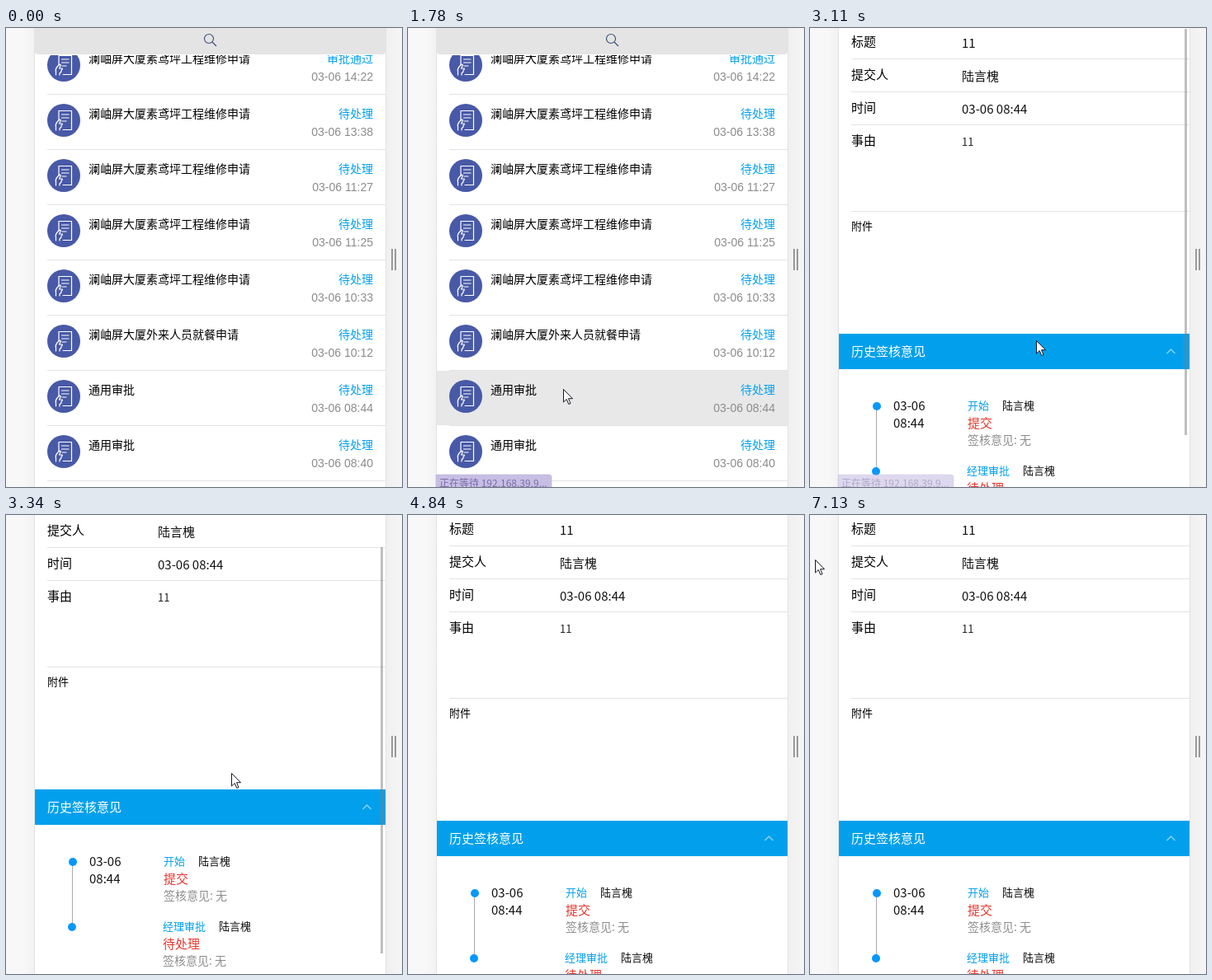
These frames come from a looping animation (480 by 557 pixels, 8 s). An HTML page:

```html
<!DOCTYPE html>
<html lang="zh-CN">
<head>
<meta charset="utf-8">
<style>
html, body { margin: 0; width: 100%; height: 100%; overflow: hidden; background: #f8f8f8; }
svg { display: block; width: 480px; height: 557px; }
text { font-family: "Noto Sans CJK SC", "Noto Sans CJK", sans-serif; white-space: pre; }
.arial { font-family: "Liberation Sans", Arial, sans-serif; }
</style>
</head>
<body>
<svg viewBox="0 0 480 557">
  <defs>
    <linearGradient id="edgeL"><stop stop-color="#f8f8f8"/><stop offset="1" stop-color="#f2f2f2"/></linearGradient>
    <linearGradient id="edgeR"><stop stop-color="#f0f0f0"/><stop offset="1" stop-color="#f5f5f5"/></linearGradient>
    <clipPath id="phone"><path d="M35 0H460V557H35Z"/></clipPath>
    <clipPath id="below"><path d="M35 33H461V557H35Z"/></clipPath>
    <g id="badge">
      <circle r="20" fill="#4859a7"/>
      <g fill="none" stroke="#fff" stroke-width="1.2" stroke-linecap="round" stroke-linejoin="round">
        <path d="M-6 0V-11.500H9.500V11.500H-1"/>
        <path d="M-2.500 -7H6M-2.500 -3H6M-2 1H3"/>
        <path d="M-9.500 12V8Q-10.500 5 -8 2L-5 -1Q-3 -1 -4 1L-5.500 4M-5.500 4H-2Q-1 5 -3 6V8L-5 10V12"/>
      </g>
    </g>
  </defs>
  <rect width="480" height="557" fill="#f8f8f8"/>
  <rect x="22" width="12" height="557" fill="url(#edgeL)"/>
  <rect x="461" width="19" height="557" fill="url(#edgeR)"/>
  <rect x="34" width="427" height="557" fill="#e3e3e3"/>
  <rect x="35" width="425" height="557" fill="#fff"/>
  <path d="M467 268h2v26h-2zM471 268h2v26h-2z" fill="#999"/>

  <g id="list">
    <g id="rows" clip-path="url(#below)">
      <rect id="tap" x="35" y="416" width="425" height="66" fill="#e8e8e8"/>
    </g>
    <path d="M34 0H461V26Q461 32 455 32H40Q34 32 34 26Z" fill="#e4e4e4"/>
    <g fill="none" stroke="#43527f" stroke-width="1.2"><circle cx="246" cy="13" r="5.500"/><path d="M250 17L255 22"/></g>
  </g>

  <g id="detail" clip-path="url(#phone)">
    <g id="page">
      <g id="form"></g>
      <g id="blank"></g>
      <g id="filled"></g>
    </g>
    <rect id="bar" x="454" width="3" height="493" fill="#808080" fill-opacity=".5"/>
  </g>

  <g id="bubble">
    <path d="M34 542H171Q174 542 174 545V557H34Z" fill="#c8bee4" stroke="#bbb1d8" stroke-width=".6"/>
    <text x="38" y="557" font-size="12" fill="#786ba5">正在等待 192.168.39.9...</text>
  </g>
  <path id="cursor" d="M.5 .5V16L4.200 12.500L6.800 18.500L9 17.500L6.500 11.700H11.500Z" fill="#fff" stroke="#181828"/>
</svg>
<script>
const LOOP = 8000;
const BLUE = '#02a0ec', RED = '#e8372e', GREY = '#8c8c8c', LINE = '#e3e3e4';
const $ = id => document.getElementById(id);

function add(parent, tag, attrs, content) {
  const el = document.createElementNS('http://www.w3.org/2000/svg', tag);
  for (const key in attrs) el.setAttribute(key, attrs[key]);
  if (content) el.textContent = content;
  parent.append(el);
}

// Places text by the vertical middle of its glyphs.
function label(parent, x, mid, size, fill, content, more) {
  add(parent, 'text', { x, y: Math.round(mid + size * 0.37), 'font-size': size, fill, ...more }, content);
}

function rule(parent, x, y) {
  add(parent, 'rect', { x, y, width: 460 - x, height: 1, fill: LINE });
}

function buildList() {
  const rows = $('rows'), end = { 'text-anchor': 'end' };
  const times = '14:22 13:38 11:27 11:25 10:33 10:12 08:44 08:40'.split(' ');
  times.forEach((time, i) => {
    const y = 67 * i;
    const title = i < 5 ? '澜岫屏大厦素鸢坪工程维修申请' : i < 6 ? '澜岫屏大厦外来人员就餐申请' : '通用审批';
    add(rows, 'use', { href: '#badge', x: 70, y: y + 45 });
    label(rows, 100, y + 37, 14, '#000', title);
    label(rows, 445, y + 37, 14, BLUE, i ? '待处理' : '审批通过', end);
    label(rows, 445, y + 59, 14, GREY, '03-06 ' + time, { ...end, class: 'arial' });
    rule(rows, 50, y + 80);
  });
}

function header(parent, y) {
  add(parent, 'rect', { x: 35, y, width: 425, height: 43, fill: BLUE });
  label(parent, 50, y + 21.5, 15, '#fff', '历史签核意见');
}

function buildDetail() {
  const form = $('form'), blank = $('blank'), filled = $('filled');
  const person = '陆言槐';
  const fields = { 标题: '11', 提交人: person, 时间: '03-06 08:44' };
  Object.entries(fields).forEach(([name, value], i) => {
    const y = 40 * i + 16;
    label(form, 50, y, 15, '#000', name);
    label(blank, 184, y + 2, 15, '#757575', name + '信息');
    label(filled, 184, y + 2, 15, '#111', value);
    rule(form, 50, y + 21);
  });
  label(form, 50, 136, 15, '#000', '事由');
  label(filled, 184, 138, 13, '#222', '11');
  rule(form, 50, 222);
  label(form, 50, 240, 13, '#000', '附件', { 'font-weight': 500 });

  header(blank, 362);
  rule(blank, 35, 455);

  header(filled, 371);
  add(filled, 'path', { d: 'M432.500 395l5 -5l5 5', fill: 'none', stroke: '#8fd3f5', 'stroke-width': 1.4 });
  add(filled, 'rect', { x: 80, y: 459, width: 1, height: 79, fill: '#aaa' });
  label(filled, 101, 458, 15, '#111', '03-06');
  label(filled, 101, 479, 15, '#111', '08:44');
  [['开始', '提交'], ['经理审批', '待处理']].forEach(([step, state], i) => {
    const x = 191 - i, y = 458 + 79 * i;
    add(filled, 'circle', { cx: 81 - i, cy: y + 1, r: 5, fill: '#0698fb' });
    label(filled, x, y, 13, BLUE, step);
    label(filled, x + 16 + 13 * step.length, y, 13, '#111', person);
    label(filled, x, y + 21, 15, RED, state);
    label(filled, x, y + 42, 14, GREY, '签核意见: 无');
  });
}

const ramp = (t, from, to) => Math.min(1, Math.max(0, (t - from) / (to - from)));
const ease = (t, from, to) => { const u = ramp(t, from, to); return u * u * (3 - 2 * u); };
const mix = (a, b, u) => a + (b - a) * u;
const frame = t => Math.max(0, t - (t - 210) % 78);

const scrollAt = t => ease(t, 3110, 3500) - ease(t, 4050, 4500);

// Pointer position, or null while it is away.
function pointer(t) {
  if (t < 210) return null;
  if (t < 1400) {
    const u = ease(t, 210, 1000);
    return [mix(309, 191, u) - 75 * Math.sin(Math.PI * u), mix(405, 448, u) + 40 * Math.sin(Math.PI * u)];
  }
  if (t < 2110) {
    const u = ramp(t, 1400, 1550);
    return [mix(191, 188, u), mix(448, 438, u)];
  }
  if (t < 4600) {
    const u = ease(t, 2180, 3090), drag = scrollAt(t);
    return [mix(249, 274, u) - 2 * drag, mix(410, 379, u) - 111 * drag];
  }
  if (t < 4750) return [154, 430];
  if (t >= 5060 && t < 5200) return [12, 12];
  if (t >= 5530 && t < 6540) {
    const u = ramp(t, 5530, 6540);
    return [mix(12, 373, ease(u, 0, 0.8)), u < 0.5 ? 540 * ease(u, 0, 0.45) : 540 - 221 * Math.sin(Math.PI * ramp(u, 0.6, 1))];
  }
  if (t >= 6700 && t < 6760) return [261, 529];
  if (t >= 6910 && t < 7120) return [6, mix(13, 54, ramp(t, 6910, 7060))];
  return null;
}

const show = (id, on) => $(id).setAttribute('display', on ? 'inline' : 'none');
const fade = (id, alpha) => $(id).setAttribute('opacity', alpha);
const move = (id, x, y) => $(id).setAttribute('transform', `translate(${Math.round(x)} ${Math.round(y)})`);

function draw(time) {
  const t = frame(time), open = time >= 2110, loaded = time >= 2480;
  show('list', !open);
  show('tap', time >= 1700);
  show('detail', open);
  show('blank', !loaded);
  show('filled', loaded);

  const top = 64 * scrollAt(t);
  move('page', 0, -top);
  move('bar', 0, 1 + top);
  fade('bar', ramp(t, 2940, 3018) - ramp(t, 3560, 3720) + ramp(t, 4050, 4120) - ramp(t, 4590, 4800));
  fade('bubble', ramp(t, 1640, 1760) - ramp(t, 2980, 3260));

  const spot = pointer(t);
  show('cursor', spot);
  if (spot) move('cursor', ...spot);
}

buildList();
buildDetail();
const begin = performance.now();
function tick() {
  draw((performance.now() - begin) % LOOP);
  requestAnimationFrame(tick);
}
tick();
</script>
</body>
</html>
```
